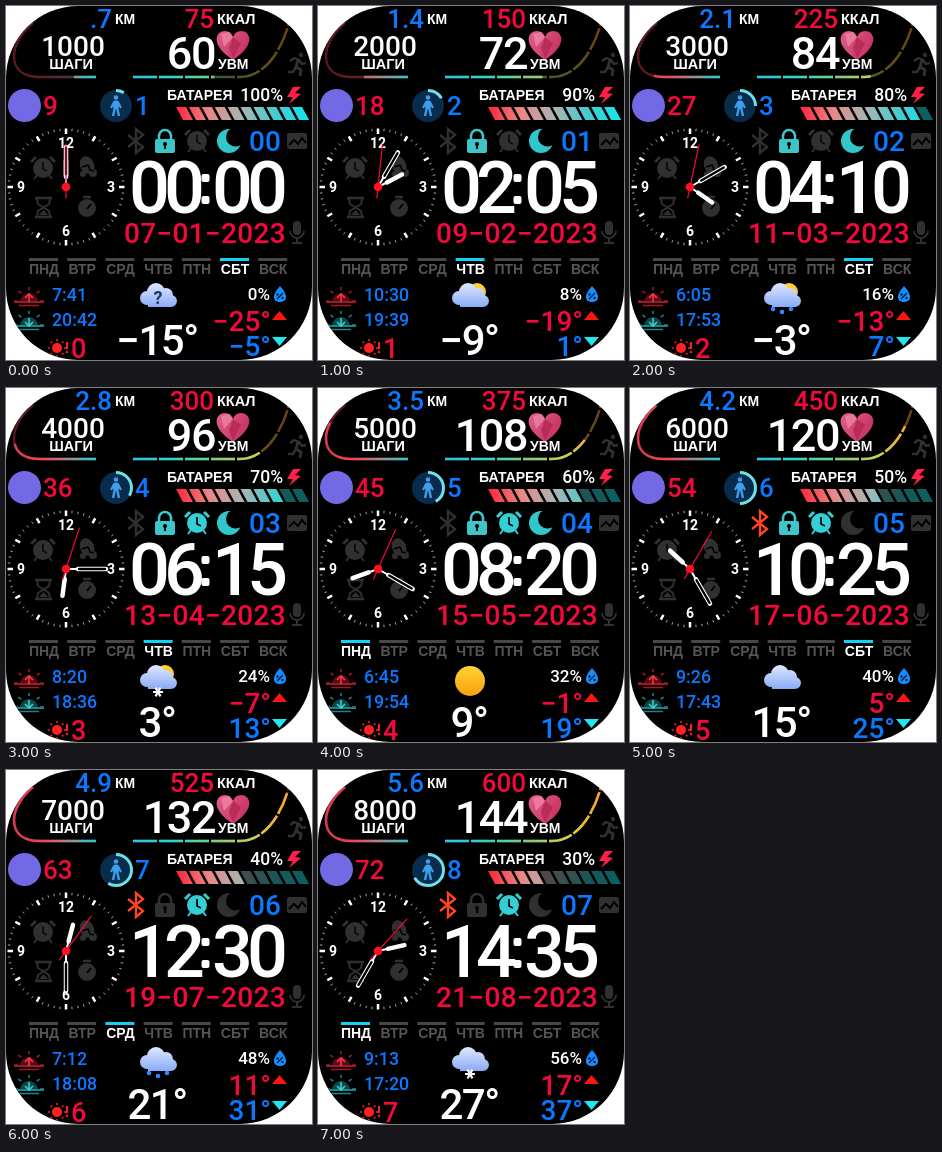
Animation of 306x354 px, one loop 8000 ms. Source, as an HTML page with a canvas:

```html
<!DOCTYPE html>
<html lang="ru">
<head>
<meta charset="utf-8">
<style>
html, body { margin: 0; width: 100%; height: 100%; overflow: hidden; background: #fff; }
canvas { display: block; }
</style>
</head>
<body>
<canvas id="face" width="306" height="354"></canvas>
<script>
const c = document.getElementById('face').getContext('2d');
const TAU = Math.PI * 2;
const RED = '#f5083c', BLUE = '#0a78ff', CYAN = '#12d2f6', TEAL = '#30c6ca', DIM = '#303030';
const DIGITS = 'Roboto, sans-serif', LABELS = '"Liberation Sans", Arial, sans-serif';
const DAYS = ['ПНД', 'ВТР', 'СРД', 'ЧТВ', 'ПТН', 'СБТ', 'ВСК'];
const SUNRISE = ['7:41', '10:30', '6:05', '8:20', '6:45', '9:26', '7:12', '9:13'];
const SUNSET = ['20:42', '19:39', '17:53', '18:36', '19:54', '17:43', '18:08', '17:20'];
const WEATHER = ['unknown', 'cloudy', 'showers', 'snowShowers', 'sunny', 'overcast', 'rain', 'snow'];
const two = n => String(n).padStart(2, '0');

function text(s, x, y, size, color, align = 'left', spacing = 0, weight = 500, font = DIGITS) {
  c.font = `${weight} ${size}px ${font}`;
  c.letterSpacing = spacing + 'px';
  c.textAlign = align;
  c.fillStyle = color;
  c.fillText(s, x, y);
}
const label = (s, x, y, color = '#fff', align = 'left', size = 14) =>
  text(s, x, y, size, color, align, 0, 700, LABELS);

function line(color, width, ...p) {
  c.strokeStyle = color;
  c.lineWidth = width;
  c.beginPath();
  for (let i = 0; i < p.length; i += 2) c.lineTo(p[i], p[i + 1]);
  c.stroke();
}
function poly(color, ...p) {
  c.fillStyle = color;
  c.beginPath();
  for (let i = 0; i < p.length; i += 2) c.lineTo(p[i], p[i + 1]);
  c.fill();
}
function disc(x, y, r, color) {
  c.fillStyle = color;
  c.beginPath();
  c.arc(x, y, r, 0, TAU);
  c.fill();
}
function ring(x, y, r, color, width, from = 0, to = TAU) {
  c.strokeStyle = color;
  c.lineWidth = width;
  c.beginPath();
  c.arc(x, y, r, from, to);
  c.stroke();
}
function box(x, y, w, h, r, color) {
  c.fillStyle = color;
  c.beginPath();
  c.roundRect(x, y, w, h, r);
  c.fill();
}
function at(x, y, draw) {
  c.save();
  c.translate(x, y);
  draw();
  c.restore();
}
function gradient(x0, y0, x1, y1, ...colors) {
  const g = c.createLinearGradient(x0, y0, x1, y1);
  colors.forEach((color, i) => g.addColorStop(i / (colors.length - 1), color));
  return g;
}

// A dim track with its first part lit.
function gauge(path, color, lit, dash) {
  c.strokeStyle = color;
  c.lineWidth = 2.5;
  c.setLineDash(dash);
  c.globalAlpha = 0.42;
  c.stroke(path);
  c.globalAlpha = 1;
  const pattern = [];
  const [on, gap] = dash.length ? dash : [lit, 0];
  for (let s = 0; s < lit; s += on + gap) pattern.push(Math.min(on, lit - s), gap);
  pattern[pattern.length - 1] = 400;
  c.setLineDash(pattern);
  c.stroke(path);
  c.setLineDash([]);
}
function gauges(k) {
  const steps = new Path2D('M90 71 H34 C18 71 8 64 8 50 C8 38 17 25 27 17');
  gauge(steps, gradient(8, 0, 90, 0, '#d83a50', '#f24358', '#a58a8c', '#2cc9cf'), 22 * (k + 1), []);
  const pulse = new Path2D('M127 71 H234 C252 71 272 56 283 17');
  gauge(pulse, gradient(127, 0, 283, 0, '#35bfe0', '#37cfc8', '#79cd83', '#c8d255', '#ffa326'),
    195 * (60 + 12 * k) / 144, [24, 2]);
}

function heart() {
  at(227, 38, () => {
    c.fillStyle = gradient(-14, -8, 12, 8, '#dc5a88', '#c83462');
    c.beginPath();
    c.moveTo(0, 16);
    c.bezierCurveTo(-24, 0, -17, -13, -8, -13);
    c.quadraticCurveTo(-2, -13, 0, -7);
    c.quadraticCurveTo(2, -13, 8, -13);
    c.bezierCurveTo(17, -13, 24, 0, 0, 16);
    c.fill();
    poly('#e9799d', -12, -10, -4, -12, 0, -7, -9, 3);
    poly('#b92d58', 0, -7, 8, -1, 0, 15, -4, 4);
  });
}

function runner() {
  at(291, 58, () => {
    disc(4, -9, 2.2, DIM);
    line(DIM, 2.4, -7, -3, -3, -6, 2, -4, 5, 0, 9, -1);
    line(DIM, 3, 1, -4, -1, 3, 4, 6, 3, 12);
    line(DIM, 2.5, -1, 3, -4, 8, -9, 8);
  });
}

function activity(k) {
  disc(18.5, 99.5, 16.5, '#7469e4');
  text(9 * (k + 1), 37, 109, 26, RED);
  disc(110, 100, 16, '#0a2c4c');
  ring(110, 100, 15.5, '#6fe0ea', 3, -TAU / 4, -TAU / 4 + TAU * (k + 1) / 12);
  disc(110, 91.5, 2.3, '#3d9eea');
  box(107, 94.5, 6, 8, 2.5, '#3d9eea');
  line('#3d9eea', 2, 108, 96, 105, 102);
  line('#3d9eea', 2, 112, 96, 115, 102);
  line('#3d9eea', 2.4, 109, 101, 107, 110);
  line('#3d9eea', 2.4, 111, 101, 113, 110);
  text(k + 1, 129, 109, 26, BLUE);
}

function battery(k) {
  label('БАТАРЕЯ', 161, 94);
  text(`${100 - 10 * k}%`, 277, 95, 17.5, '#fff', 'right');
  poly('#ff1f48', 287, 81, 281, 91, 287, 91, 283, 98, 295, 88, 289, 87, 295, 81);
  const color = gradient(170, 0, 303, 0, '#ff2438', '#e88786', '#a9b5b5', '#43cccf', '#10e8f0');
  for (let i = 0; i < 10; i++) {
    const x = 170 + i * 12.9;
    c.globalAlpha = i < 11 - k ? 1 : 0.42;
    poly(color, x, 101, x + 10, 101, x + 17, 114, x + 7, 114);
  }
  c.globalAlpha = 1;
}

function alarm(x, y, color) {
  at(x, y, () => {
    disc(0, 1, 10, color);
    line(color, 3, -12, -5, -7, -10);
    line(color, 3, 12, -5, 7, -10);
    line(color, 2, -6, 8, -9, 12);
    line(color, 2, 6, 8, 9, 12);
    line('#0b0b0b', 1.8, 0, -5, 0, 2, 4, 4);
  });
}

function statusIcons(k) {
  const bt = k > 4 ? '#ff4420' : DIM, lock = k < 6 ? '#3fc4c9' : DIM;
  line(bt, 2.4, 122, 129, 137, 141, 130, 147, 130, 123, 137, 129, 122, 141);
  ring(159, 130, 6, lock, 2.5, Math.PI, TAU);
  line(lock, 2.5, 153, 129, 153, 135);
  line(lock, 2.5, 165, 129, 165, 135);
  box(149, 133, 20, 14, 2, lock);
  disc(159, 138, 2, '#000');
  line('#000', 2, 159, 138, 159, 143);
  alarm(191, 134, k > 2 ? '#33cfd4' : DIM);
  disc(223, 135, 12, k < 5 ? TEAL : DIM);
  disc(229.5, 131, 9.5, '#000');
  text(two(k), 243, 144.5, 28, BLUE);
  box(281, 127, 20, 16, 2, DIM);
  line('#000', 2, 283, 139, 288, 134, 292, 138, 296, 132, 300, 137);
}

function analog(k) {
  const x = 60, y = 181;
  for (let i = 0; i < 60; i++) {
    const a = i * TAU / 60, s = Math.sin(a), q = -Math.cos(a), inner = i % 5 ? 56 : 53;
    line(i % 5 ? '#aaa' : '#fff', i % 5 ? 1 : 2.5, x + s * inner, y + q * inner, x + s * 58.5, y + q * 58.5);
  }
  [12, 3, 6, 9].forEach((n, i) => {
    const a = i * TAU / 4;
    text(n, x + Math.sin(a) * 45, y + 5 - Math.cos(a) * 44, 14, '#fff', 'center', 0, 700);
  });
  alarm(37, 161, DIM);
  c.fillStyle = DIM;
  c.beginPath();
  c.ellipse(81, 159, 7, 9, -0.4, 0, TAU);
  c.fill();
  disc(87, 167, 4, DIM);
  disc(77, 168, 3, DIM);
  line('#000', 1.5, 76, 161, 82, 159, 84, 164, 88, 165);
  line(DIM, 2.5, 29, 192, 46, 192);
  line(DIM, 2.5, 29, 211, 46, 211);
  line(DIM, 2, 31, 193, 32, 198, 43, 205, 44, 210);
  line(DIM, 2, 44, 193, 43, 198, 32, 205, 31, 210);
  poly(DIM, 33, 209, 42, 209, 37.5, 204);
  disc(81, 202, 9, DIM);
  line(DIM, 2.5, 77, 191, 85, 191);
  line('#000', 2, 81, 203, 85, 198);

  const minutes = 125 * k;
  hand(minutes / 720, () => {
    line('#fff', 2, 0, 0, 0, -10);
    line('#fff', 4.5, 0, -10, 0, -27);
  });
  hand(minutes / 60, () => {
    line('#fff', 2, 0, 0, 0, -12);
    line('#fff', 4.5, 0, -12, 0, -40);
    line('#000', 2.4, 0, -13, 0, -39);
  });
  hand(k / 60, () => line(RED, 1.2, 0, 11, 0, -43));
  disc(x, y, 4.3, '#ff1020');
}
function hand(turn, draw) {
  at(60, 181, () => {
    c.rotate(turn * TAU);
    c.lineCap = 'round';
    draw();
  });
}

function calendar(k) {
  const minutes = 125 * k;
  text(two(Math.floor(minutes / 60)), 123, 207, 72, '#fff', 'left', -6);
  box(195.5, 168, 8, 8, 2, '#fff');
  box(195.5, 190, 8, 8, 2, '#fff');
  text(two(minutes % 60), 206, 207, 72, '#fff', 'left', -6);
  text(`${two(7 + 2 * k)}−${two(k + 1)}−2023`, 118, 237, 28, RED, 'left', 0.3);
  box(287, 215, 8, 14, 4, DIM);
  ring(291, 225, 7, DIM, 1.8, 0, Math.PI);
  line(DIM, 2, 291, 232, 291, 237);
  line(DIM, 2, 286, 237, 296, 237);

  const today = (new Date(2023, k, 7 + 2 * k).getDay() + 6) % 7;
  DAYS.forEach((day, i) => {
    const x = 38 + i * 38.2, on = i === today;
    c.fillStyle = on ? CYAN : '#484848';
    c.fillRect(x - 15, 252, 29, 3);
    label(day, x, 268, on ? '#fff' : '#555', 'center');
  });
}

function horizon(y, color, arrow, up) {
  at(23, y, () => {
    c.fillStyle = color;
    c.globalAlpha = 0.55;
    c.beginPath();
    c.arc(0, 6, 9, Math.PI, TAU);
    c.fill();
    c.globalAlpha = 1;
    line(color, 1.8, -15, 6, 15, 6);
    line(color, 1.6, -10, 9.5, 10, 9.5);
    for (let i = 0; i < 5; i++) {
      const a = Math.PI * (1 + i / 4), s = Math.sin(a), q = Math.cos(a);
      line(color, 1.6, q * 11, 5 + s * 11, q * 15, 5 + s * 14);
    }
    const d = up ? 1 : -1;
    line(arrow, 1.6, 0, 2 + d * 4, 0, 2 - d * 4);
    line(arrow, 1.6, -4, 2, 0, 2 - d * 4, 4, 2);
  });
}

function cloud() {
  const parts = [[-11, 1, 7], [-2, -5, 9], [8, -2, 7], [13, 4, 6]];
  c.fillStyle = gradient(0, -14, 0, 11, '#dfe8ff', '#86a8f5');
  c.beginPath();
  parts.forEach(([x, y, r]) => { c.moveTo(x + r, y); c.arc(x, y, r, 0, TAU); });
  c.rect(-10, 0, 23, 10);
  c.fill();
}
function weather(kind) {
  at(152, 291, () => {
    const sun = gradient(0, -14, 0, 14, '#ffd535', '#f9a510');
    if (kind === 'sunny') return disc(0, 2, 15, sun);
    if (kind === 'cloudy' || kind.endsWith('howers')) disc(7, -5, 9, sun);
    cloud();
    if (kind === 'unknown') text('?', 0, 7, 18, '#203864', 'center', 0, 700);
    if (kind === 'showers' || kind === 'rain') {
      [-9, 0, 9].forEach(x => disc(x, x ? 12 : 15, 2.3, '#3189ff'));
    }
    if (kind.startsWith('snow')) {
      for (let i = 0; i < 3; i++) {
        const a = i * Math.PI / 3, q = Math.cos(a) * 5, s = Math.sin(a) * 5;
        line('#fff', 2.2, -q, 13 - s, q, 13 + s);
      }
    }
  });
}

function forecast(k) {
  const degrees = n => `${n < 0 ? '−' : ''}${Math.abs(n)}°`;
  horizon(290, '#a5162a', '#ff3548', true);
  horizon(314, '#1b8588', '#38d0d0', false);
  text(SUNRISE[k], 46, 295, 17.8, BLUE);
  text(SUNSET[k], 46, 320, 17.8, BLUE);
  disc(51, 342, 5, '#ff2020');
  for (let i = 0; i < 8; i++) {
    const a = i * TAU / 8;
    disc(51 + Math.cos(a) * 8, 342 + Math.sin(a) * 8, 1, '#ff2020');
  }
  line('#ff2020', 2, 61, 336, 61, 343);
  disc(61, 346, 1.2, '#ff2020');
  text(k, 65, 352, 27, RED);
  weather(WEATHER[k]);
  text(degrees(6 * k - 15), 151, 349, 42, '#fff', 'center', -1.5);

  text(`${8 * k}%`, 264, 294, 17, '#fff', 'right');
  c.fillStyle = '#178cff';
  c.beginPath();
  c.moveTo(274, 280);
  c.bezierCurveTo(284, 291, 280, 296, 274, 296);
  c.bezierCurveTo(268, 296, 264, 291, 274, 280);
  c.fill();
  line('#021c38', 1.2, 271, 293, 277, 287);
  disc(271.5, 288.5, 1.2, '#021c38');
  disc(276.5, 292, 1.2, '#021c38');
  text(degrees(6 * k - 25), 265, 325, 28, RED, 'right');
  text(degrees(6 * k - 5), 265, 349.5, 28, BLUE, 'right');
  poly('#ff1414', 273.5, 305, 281, 314, 266, 314);
  poly('#20e8f0', 266, 331, 281, 331, 273.5, 340);
}

function draw(k) {
  c.fillStyle = '#fff';
  c.fillRect(0, 0, 306, 354);
  c.save();
  c.beginPath();
  c.roundRect(0, 0, 306, 354, 72);
  c.clip();
  c.fillStyle = '#000';
  c.fillRect(0, 0, 306, 354);
  gauges(k);
  text((0.7 * (k + 1)).toFixed(1).replace(/^0/, ''), 106, 21.5, 26, BLUE, 'right');
  label('КМ', 109, 17.5);
  text(75 * (k + 1), 208, 21.5, 26, RED, 'right');
  label('ККАЛ', 211, 17.5, '#fff', 'left', 14.5);
  text(1000 * (k + 1), 67, 50, 28, '#fff', 'center');
  label('ШАГИ', 65, 63, '#fff', 'center', 14.5);
  heart();
  text(60 + 12 * k, 209, 63, 45, '#fff', 'right', -1.5);
  label('УВМ', 212, 63);
  runner();
  activity(k);
  battery(k);
  statusIcons(k);
  analog(k);
  calendar(k);
  forecast(k);
  c.restore();
}

function tick(now) {
  draw(Math.floor(now / 1000) % 8);
  requestAnimationFrame(tick);
}
draw(0);
requestAnimationFrame(tick);
</script>
</body>
</html>
```
